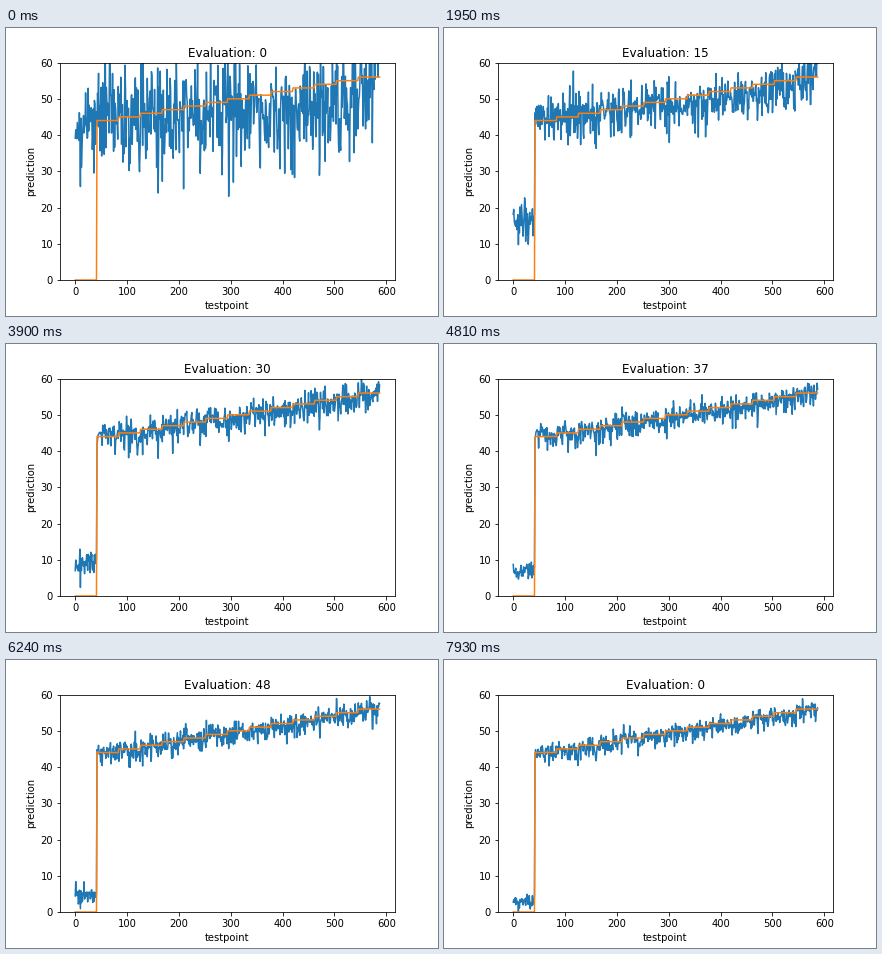
A matplotlib script that plays this animation: 432 px wide and 288 px high, repeating every 8000 ms.

```python
import numpy as np
import matplotlib.pyplot as plt
from matplotlib.animation import FuncAnimation

LOOP, TICK, STEP = 8000, 25, 130      # ms
RUN = 61                              # evaluations before the counter restarts
GROUP, GROUPS = 42, 14
SNAPSHOTS = -(-LOOP // STEP)

x = np.arange(GROUP * GROUPS)
blank = x < GROUP
truth = np.where(blank, 0, 43 + x // GROUP)

# the untrained model: nearly flat, rising only at the far end
untrained = 44 + 18 * np.exp((x - x[-1]) / 35)


def decay(k, span):
    return np.exp(-k / span)


def mean_output(k):
    lift = 2.5 * decay(k, 14) - 0.5
    body = truth + (untrained - truth) * decay(k, 14) + lift
    empty = 29 * decay(k, 26) + 14 * decay(k, 2)
    return np.where(blank, empty, body)


def spread(k):
    return np.where(blank, 0.8 + 5 * decay(k, 18), 1.4 + 6 * decay(k, 14))


def make_snapshots():
    rng = np.random.default_rng(12)
    # per-point error with a long lower tail, plus slowly changing noise
    fixed = (np.euler_gamma - rng.gumbel(size=x.size)) / 1.28
    drift = rng.standard_normal(x.size)
    result = []
    for k in range(SNAPSHOTS):
        noise = 0.6 * fixed + 0.8 * drift
        result.append(np.maximum(mean_output(k) + spread(k) * noise, 0))
        drift = 0.75 * drift + 0.66 * rng.standard_normal(x.size)
    return result


snapshots = make_snapshots()

fig, ax = plt.subplots(figsize=(6, 4), dpi=72)
fig.subplots_adjust(left=0.125, right=0.9, bottom=0.125, top=0.88)
prediction, = ax.plot(x, snapshots[0])
ax.plot(x, truth)
ax.set_ylim(0, 60)
ax.set_xlabel("testpoint")
ax.set_ylabel("prediction")
title = ax.set_title("Evaluation: 0")


def update(i):
    k = min((i * TICK + TICK - 5) // STEP, SNAPSHOTS - 1)
    prediction.set_ydata(snapshots[k])
    title.set_text(f"Evaluation: {k % RUN}")
    return prediction, title


anim = FuncAnimation(fig, update, frames=LOOP // TICK, interval=TICK,
                     repeat=True, repeat_delay=0, blit=False)
plt.show()
```
